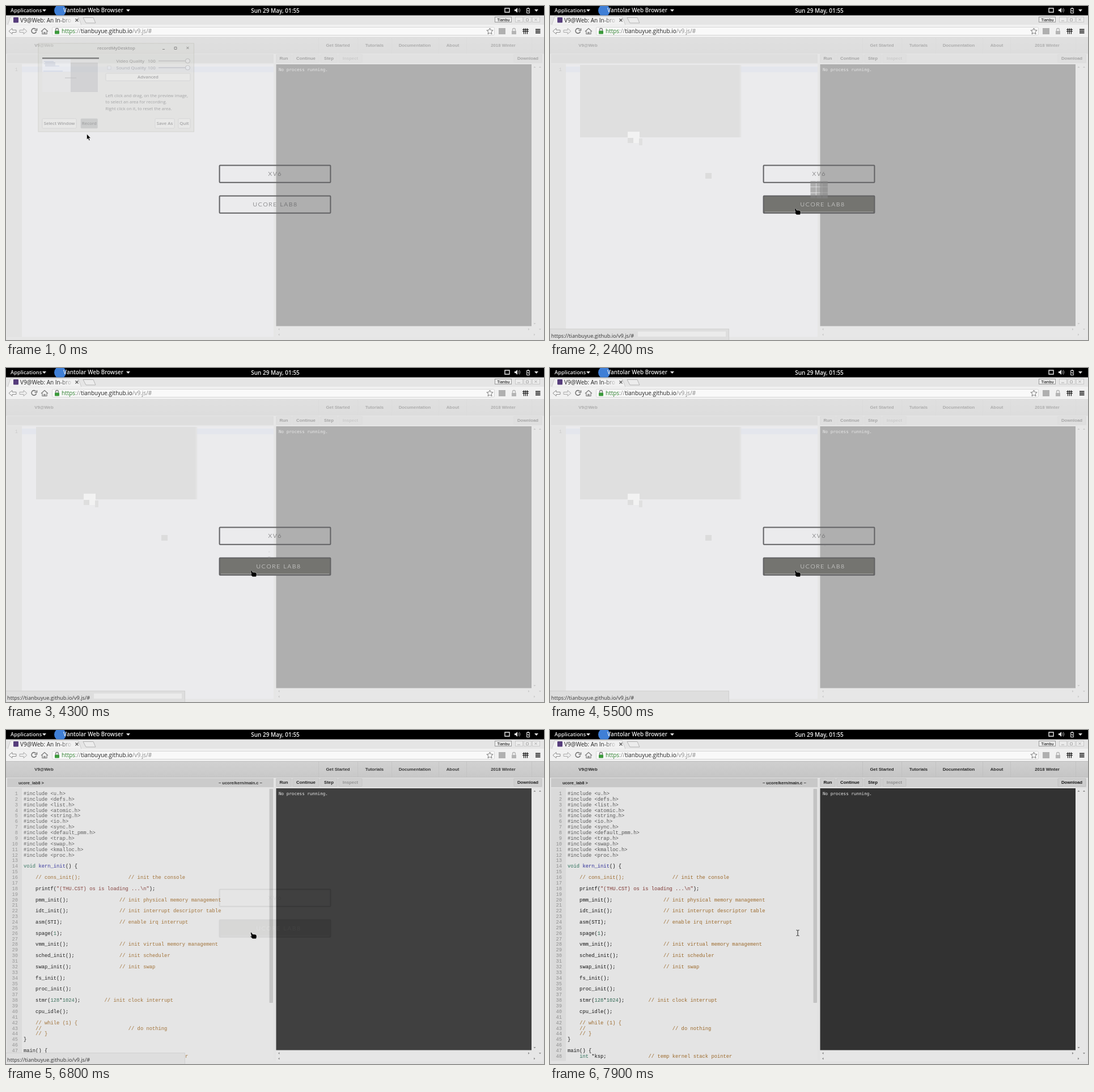
An HTML page that plays this animation: 949 px wide and 590 px high, repeating every 8 s.

```html
<!DOCTYPE html>
<html lang="en">
<head>
<meta charset="utf-8">
<title>Web IDE demo</title>
<style>
html, body { margin: 0; width: 100%; height: 100%; overflow: hidden; background: #e4e4e4; }
svg { display: block; width: 949px; height: 590px; }
text { white-space: pre; }
.ui { font-family: "Open Sans", sans-serif; }
.site { font: bold 7.8px "Liberation Sans", Arial, sans-serif; }
.code { font: 8.8px "Liberation Mono", monospace; }
.term { font: 7.6px "DejaVu Sans Mono", monospace; }
.big { font: 300 10.5px Lato, sans-serif; letter-spacing: 1.6px; }
</style>
</head>
<body>
<svg id="stage" viewBox="0 0 949 590" xmlns="http://www.w3.org/2000/svg"></svg>
<script>
const LOOP = 8000;
const HOST = "tianbuyue.github.io";

const esc = s => s.replace(/&/g, "&amp;").replace(/</g, "&lt;");
const rect = (x, y, w, h, fill, more = "") =>
  `<rect x="${x}" y="${y}" width="${w}" height="${h}" fill="${fill}" ${more}/>`;
const path = (d, stroke, more = "") => `<path d="${d}" fill="none" stroke="${stroke}" ${more}/>`;
const shape = (d, fill, more = "") => `<path d="${d}" fill="${fill}" ${more}/>`;
const text = (cls, x, y, s, fill = "#111", more = "") =>
  `<text class="${cls}" x="${x}" y="${y}" fill="${fill}" ${more}>${esc(s)}</text>`;
const ui = (x, y, s, size, fill, more = "") => text("ui", x, y, s, fill, `font-size="${size}" ${more}`);
const mid = 'text-anchor="middle"';
const semi = 'font-weight="600"';
const caret = (x, y) => shape(`M${x} ${y}h7l-3.5 4z`, "#e8e8e8");
const group = (id, body, more = "") => `<g id="${id}" ${more}>${body}</g>`;

// Desktop bar
function desktopBar() {
  return rect(0, 0, 949, 16.5, "#000") +
    ui(8, 11.2, "Applications", 9.3, "#e8e8e8", semi) + caret(64, 6) +
    `<circle cx="95.5" cy="8" r="10.5" fill="#3f7fd6" clip-path="url(#bar)"/>` +
    ui(101, 11.2, "Vantolar Web Browser", 9.9, "#e8e8e8", semi) + caret(212, 6) +
    ui(475, 11.5, "Sun 29 May, 01:55", 10, "#f0f0f0", semi + mid) +
    path("M880 4h8v7h-8z", "#e8e8e8", 'stroke-width="1.4"') +
    shape("M897 6h2l3-3v9l-3-3h-2z", "#e8e8e8") +
    path("M903.500 5q2 2.500 0 5M905 3.500q3.500 4 0 8", "#aaa") +
    path("M918.500 4.500h5v8h-5zM920 3.500h2", "#e8e8e8") +
    shape("M921.500 5l-2 4h1.500l-.5 3 2-4h-1.500z", "#e8e8e8") + caret(932, 6);
}

// Browser frame: tab strip and address bar
function browser() {
  const box = x => rect(x, 19.5, 13, 9, "#ebebeb", 'stroke="#cacaca"');
  let s = rect(0, 16.5, 949, 17, "#e5e5e5") + rect(0, 33, 949, 22, "#f1f1f1") +
    shape("M3 33.500L8 18.500H127L133 33.500z", "#f1f1f1", 'stroke="#bcbcbc" stroke-width=".7"') +
    rect(0, 33.2, 949, 1, "#f1f1f1") +
    rect(13, 20, 9, 9.5, "#563d7c", 'rx="1"') +
    ui(25, 28.8, "V9@Web: An In-bro", 10, "url(#fade)") +
    path("M122.500 22.500l5 5m0-5l-5 5", "#555", 'stroke-width="1.2"') +
    shape("M136 20.500h18l4 9.500h-17z", "#ececec", 'stroke="#b5b5b5"') +
    rect(862.5, 19.5, 29, 9, "#eee", 'stroke="#999"') +
    ui(877.5, 26.5, "Tianbu", 6.6, "#222", semi + mid) +
    box(898.5) + box(913.5) + box(928.5) +
    path("M902 26h5M917.500 22.500h4v4h-4zM932.500 22l4 4m0-4l-4 4", "#aaa");
  s += shape("M5 44.500l6-5v3h7v4h-7v3z", "#f6f6f6", 'stroke="#8b8b8b"') +
    shape("M37 44.500l-6-5v3h-7v4h7v3z", "#eee", 'stroke="#aaa"') +
    path("M52.500 41a4.300 4.300 0 1 0 1 4M54.500 39.500v3.500h-4", "#777", 'stroke-width="1.6"') +
    path("M62 45l6-5.500 6 5.500M64 44.500v5h8v-5M67 49.500v-3h2v3", "#777", 'stroke-width="1.2"');
  s += rect(81.5, 37.5, 780, 14, "#f9f9f9", 'stroke="#d6d6d6" rx="2"') +
    rect(86, 43.5, 8, 6, "#3b9a3b", 'rx="1"') + path("M87.500 44v-2a2.500 2.500 0 0 1 5 0v2", "#777", 'stroke-width="1.3"') +
    `<text class="ui" x="98" y="48.200" font-size="10" fill="#888"><tspan fill="#2b7d2b">https</tspan>://<tspan fill="#222">${HOST}</tspan>/v9.js/#</text>` +
    path("M853.500 39l1.600 3.600 4 .4-3 2.700.9 3.900-3.500-2-3.500 2 .9-3.900-3-2.700 4-.4z", "#777") +
    rect(869, 39, 12, 11, "#b0b0b0") +
    rect(892, 44, 8, 6, "#b4b4b4") + path("M893.500 44v-2a2.500 2.500 0 0 1 5 0v2", "#b4b4b4", 'stroke-width="1.3"') +
    path("M911 44.500h11M913.500 39.500v10M916.500 39.500v10M919.500 39.500v10M911 41.500h11", "#111", 'stroke-width="1.200"') +
    path("M934 41.500h8.500M934 44.500h8.500M934 47.500h8.500", "#333", 'stroke-width="1.800"');
  return s;
}

// Web page: menus, empty editor, terminal
function page() {
  const menu = [[67, "V9@Web"], [585.5, "Get Started"], [650, "Tutorials"], [721, "Documentation"],
    [788, "About"], [877, "2018 Winter"]];
  const tools = [[477, 26, "Run"], [506, 46, "Continue"], [555, 29, "Step"], [587, 41, "Inspect"], [896, 49, "Download"]];
  let s = rect(0, 55, 949, 535, "#e2e2e2") + rect(0, 55, 949, 28, "url(#head)") +
    path("M0 55.500H949M0 83.500H949", "#b4b4b4", 'stroke-width=".8"') +
    path("M551.500 56v27M620.500 56v27M680.500 56v27M763.500 56v27M812.500 56v27M927.500 56v27", "#bdbdbd", 'stroke-width=".7"');
  for (const [x, label] of menu) s += text("site", x, 72, label, "#2a2a2a", mid);
  s += rect(2, 85, 470, 16, "#c8c8c8") + rect(476, 85, 470, 16, "#d2d2d2");
  for (const [x, w, label] of tools)
    s += rect(x, 85.5, w, 14, "#cdcdcd", 'stroke="#bbb" stroke-width=".6" rx="1"') +
      text("site", x + w / 2, 95.2, label, label === "Inspect" ? "#8c8c8c" : "#111", mid);
  s += rect(2, 102.5, 470, 482, "#e4e4e4") + rect(2, 102.5, 26, 482, "#dadada") +
    rect(476.5, 103, 450.5, 462.5, "#323232") + text("term", 481, 114.8, "No process running.", "#e8e8e8") +
    rect(927, 103, 20, 482, "#e6e6e6") + rect(476.5, 566, 470, 19, "#e6e6e6");
  const tri = (x, y, d) => shape(`M${x} ${y}${d}z`, "#888");
  const up = "l2-2.500 2 2.500", left = "l2.500-2v4", right = "l-2.500-2v4", down = "l2 2.500 2-2.500";
  return s + tri(930.500, 109, up) + tri(940, 109, up) + tri(930.500, 560, down) + tri(940, 570, down) +
    tri(480, 571, left) + tri(480, 580.500, left) + tri(923.500, 571, right) + tri(933.500, 580.500, right);
}

const CODE = String.raw`#include <u.h>
#include <defs.h>
#include <list.h>
#include <atomic.h>
#include <string.h>
#include <io.h>
#include <sync.h>
#include <default_pmm.h>
#include <trap.h>
#include <swap.h>
#include <kmalloc.h>
#include <proc.h>

void kern_init() {

    // cons_init();@35// init the console

    printf("(THU.CST) os is loading ...\n");

    pmm_init();@32// init physical memory management

    idt_init();@32// init interrupt descriptor table

    asm(STI);@32// enable irq interrupt

    spage(1);

    vmm_init();@32// init virtual memory management

    sched_init();@32// init scheduler

    swap_init();@32// init swap

    fs_init();

    proc_init();

    stmr(128*1024);@27// init clock interrupt

    cpu_idle();

    // while (1) {
    //@35// do nothing
    // }
}

main() {
    int *ksp;@27// temp kernel stack pointer`.split("\n");

const TOKEN = /(\/\/.*)|(#.*)|(".*")|\b(void|int)\b|\b(kern_init)\b|\b(\d+)\b/g;
const INK = ["#9c6a2c", "#555", "#7d3430", "#2a6e58", "#2c2c98", "#2c6650"];

function highlight(line) {
  let out = "", at = 0;
  for (const m of line.matchAll(TOKEN)) {
    const kind = m.slice(1).findIndex(Boolean);
    out += esc(line.slice(at, m.index)) + `<tspan fill="${INK[kind]}">${esc(m[0])}</tspan>`;
    at = m.index + m[0].length;
  }
  return out + esc(line.slice(at));
}

const lineNo = n => text("code", 21, 115 + (n - 1) * 9.87, String(n), "#909090", 'text-anchor="end"');

function listing() {
  let s = text("site", 22, 96, "ucore_lab8 >", "#222", 'style="font-size:7.300px"') +
    text("site", 452, 96, "~ ucore/kern/main.c ~", "#222", 'text-anchor="end" style="font-size:7.500px"');
  CODE.forEach((raw, i) => {
    const [head, col] = raw.split(/@(?=\d)/);
    const line = col ? head.padEnd(parseInt(col)) + col.slice(2) : head;
    s += lineNo(i + 1) + `<text class="code" x="31" y="${115 + i * 9.87}" fill="#111">${highlight(line)}</text>`;
  });
  return s + rect(464.5, 104, 6.5, 378, "#c3c3c3", 'rx="1"');
}

// Screen recorder window that fades away
function recorder() {
  const button = (x, y, w, h, label, fill = "#e4e4e0") =>
    rect(x, y, w, h, fill, 'stroke="#aaa" stroke-width=".7" rx="1.500"') +
    ui(x + w / 2, y + h / 2 + 2.8, label, 7.8, "#444", semi + mid);
  const slider = (y, label, tone) =>
    ui(194.5, y + 2.8, label, 8, tone) + ui(250, y + 2.8, "100", 8, tone) +
    path(`M269 ${y}h55`, "#aaa", 'stroke-width="2"') +
    `<circle cx="320.500" cy="${y}" r="4" fill="#e6e6e6" stroke="#888"/>`;
  const hint = ["Left click and drag, on the preview image,", "to select an area for recording.", "Right click on it, to reset the area."];
  return rect(57, 66, 274.5, 156, "#d9dad5", 'stroke="#b4b4a8"') + path("M57 83.500h274", "#cfcfc8") +
    ui(194.5, 77, "recordMyDesktop", 7.8, "#444", semi + mid) +
    path("M276 76.500h4M297 72.500h4v4h-4zM318.500 72l4 4m0-4l-4 4", "#111") +
    rect(64, 91, 99, 61, "#dedede") + rect(64, 91, 100, 2.5, "#000") + rect(64, 94, 50, 22, "#eef0f6") +
    path("M67 98h17M67 102h12M72 106h22M66 115h34", "#9fb2d8") + rect(69, 99, 18, 8, "#c3cbdc") +
    rect(114, 100, 48, 52, "#b2b2b4") + path("M104 127h20", "#888") +
    slider(97, "Video Quality", "#444") + slider(109, "Sound Quality", "#666") +
    rect(179, 106, 6, 6, "#e6e6e6", 'stroke="#aaa" stroke-width=".7"') +
    button(176, 119, 149, 13, "Advanced") +
    hint.map((h, i) => ui(175.5, 160.5 + i * 11.8, h, 7.6, "#444")).join("") +
    button(64, 199, 60, 17, "Select Window") + button(132, 199, 29.5, 17, "Record", "#a0a3a1") +
    button(263, 199, 34, 17, "Save As") + button(304, 199, 21, 17, "Quit");
}

// Pale leftovers once the recorder is gone
const ghost = () => rect(53, 104, 284, 128, "#dfdfdf") + path("M335.500 104v128", "#e8e8e8") +
  rect(137, 222, 21, 20, "#f2f2f2") + rect(137, 233, 10, 9, "#dedede") + rect(157, 234, 6, 12, "#e0e0e0") +
  rect(274, 295, 11, 10, "#dcdcdc");

const bigButton = y => rect(376.6, y, 195.8, 30.2, "none", 'stroke="#626264" stroke-width="2" rx="1"');

function cubes() {
  let s = "";
  for (let i = 0; i < 9; i++) s += rect(-5.1, -5.1, 10.2, 10.2, "#858585", 'class="cube"');
  return s;
}

const $ = id => document.getElementById(id);
$("stage").innerHTML = `<defs>
  <clipPath id="bar"><rect width="949" height="16.500"/></clipPath>
  <clipPath id="ed"><rect x="0" y="84" width="474" height="501"/></clipPath>
  <linearGradient id="fade"><stop offset=".75" stop-color="#222"/><stop offset="1" stop-color="#222" stop-opacity=".15"/></linearGradient>
  <linearGradient id="head" x2="0" y2="1"><stop stop-color="#d0d0d0"/><stop offset="1" stop-color="#c5c5c5"/></linearGradient>
  </defs>` +
  page() +
  group("blank", rect(28, 102.5, 444, 482, "#f4f4fb") + rect(28, 107, 444, 10, "#dce3fb") + lineNo(1)) +
  group("listing", listing(), 'clip-path="url(#ed)"') +
  group("overlay",
    rect(0, 55, 949, 535, "#e8e8e8", 'opacity=".687"') +
    group("ghost", ghost()) +
    group("hover", rect(376.6, 281.6 + 54, 195.8, 30.2, "#747470") + path("M379 363.800h191", "#aaa")) +
    bigButton(281.6) + bigButton(335.6) +
    text("big", 474.7, 299.8, "XV6", "#4c4c4e", mid) +
    text("big", 475.2, 353.8, "UCORE LAB8", "#4c4c4e", 'id="label" ' + mid) +
    group("spin", cubes())) +
  group("recorder", recorder()) +
  browser() + desktopBar() +
  group("status", rect(-1, 570.5, 316.5, 20, "#dedede", 'stroke="#d0d0d0"') +
    group("stale", rect(155, 575, 155, 9, "#ebebeb")) +
    ui(2, 586, `https://${HOST}/v9.js/#`, 9.2, "#333")) +
  group("arrow", shape("M0 0v10l2.300-2 1.700 3.800 1.700-.8-1.700-3.600h3z", "#000", 'stroke="#fff" stroke-width=".6"')) +
  group("hand", shape("M-4.500-3.500q1-1.500 2 0l1.500 2.500 5 .5q2 .5 2 2.500v2.500l-1 2.500h-6l-4-4q0-1.500 2 0z", "#000", 'stroke="#fff" stroke-width=".4"')) +
  group("beam", path("M434.500 353.500q2 0 2.500 1 .5-1 2.500-1M437 354.500v8M434.500 363.500q2 0 2.500-1 .5 1 2.500 1", "#222"));

const clamp = v => Math.min(1, Math.max(0, v));
const ramp = (t, a, b) => clamp((t - a) / (b - a));
const smooth = p => p * p * (3 - 2 * p);
const mix = (a, b, p) => a + (b - a) * p;
const show = (id, on) => $(id).setAttribute("display", on ? "inline" : "none");
const alpha = (id, v) => $(id).setAttribute("opacity", v);
const place = (id, x, y) => $(id).setAttribute("transform", `translate(${x} ${y})`);
const cubeEls = [...document.querySelectorAll(".cube")];

function overlayAlpha(t) {
  if (t < 6700) return mix(1, 0.87, ramp(t, 6600, 6700));
  if (t < 6800) return mix(0.87, 0.11, ramp(t, 6700, 6800));
  return mix(0.11, 0, ramp(t, 6800, 7000));
}

// Cube grid: shrink to nothing at 35 %, back at 70 %, then rest
function cubeScale(ms) {
  const p = ((ms % 1300) + 1300) % 1300 / 1300;
  return p < 0.35 ? 1 - smooth(p / 0.35) : smooth(clamp((p - 0.35) / 0.35));
}

function render(t) {
  const loaded = t >= 6600;
  show("blank", !loaded);
  show("listing", loaded);
  alpha("overlay", overlayAlpha(t));
  alpha("recorder", 0.42 * (1 - ramp(t, 200, 600)));
  alpha("ghost", loaded ? 0 : ramp(t, 300, 700));

  const over = ramp(t, 800, 1000);
  alpha("hover", over);
  $("label").setAttribute("fill", over > 0.5 ? "#f0f0f0" : "#4c4c4e");
  $("label").setAttribute("x", mix(475.2, 481.2, over));
  show("status", t >= 1000 && t < 7100);
  show("stale", t < 4400);

  const go = smooth(ramp(t, 200, 1000));
  const x = mix(142.5, 436, go), y = mix(226, 361.7, go);
  place("arrow", x, y);
  place("hand", x, y);
  show("arrow", t < 850);
  show("hand", t >= 850 && t < 6900);
  show("beam", t >= 6900);

  show("spin", t >= 1700 && !loaded);
  cubeEls.forEach((el, i) => {
    const col = i % 3, row = (i - col) / 3;
    const s = cubeScale(t - 1045 - (col + 2 - row) * 60);
    el.setAttribute("transform", `translate(${464.2 + col * 10.4} ${314.2 + row * 10.4}) scale(${s * 0.95})`);
    el.setAttribute("opacity", 0.6 * s);
  });
}

const start = performance.now();
function tick() {
  render((performance.now() - start) % LOOP);
  requestAnimationFrame(tick);
}
render(0);
requestAnimationFrame(tick);
</script>
</body>
</html>
```
